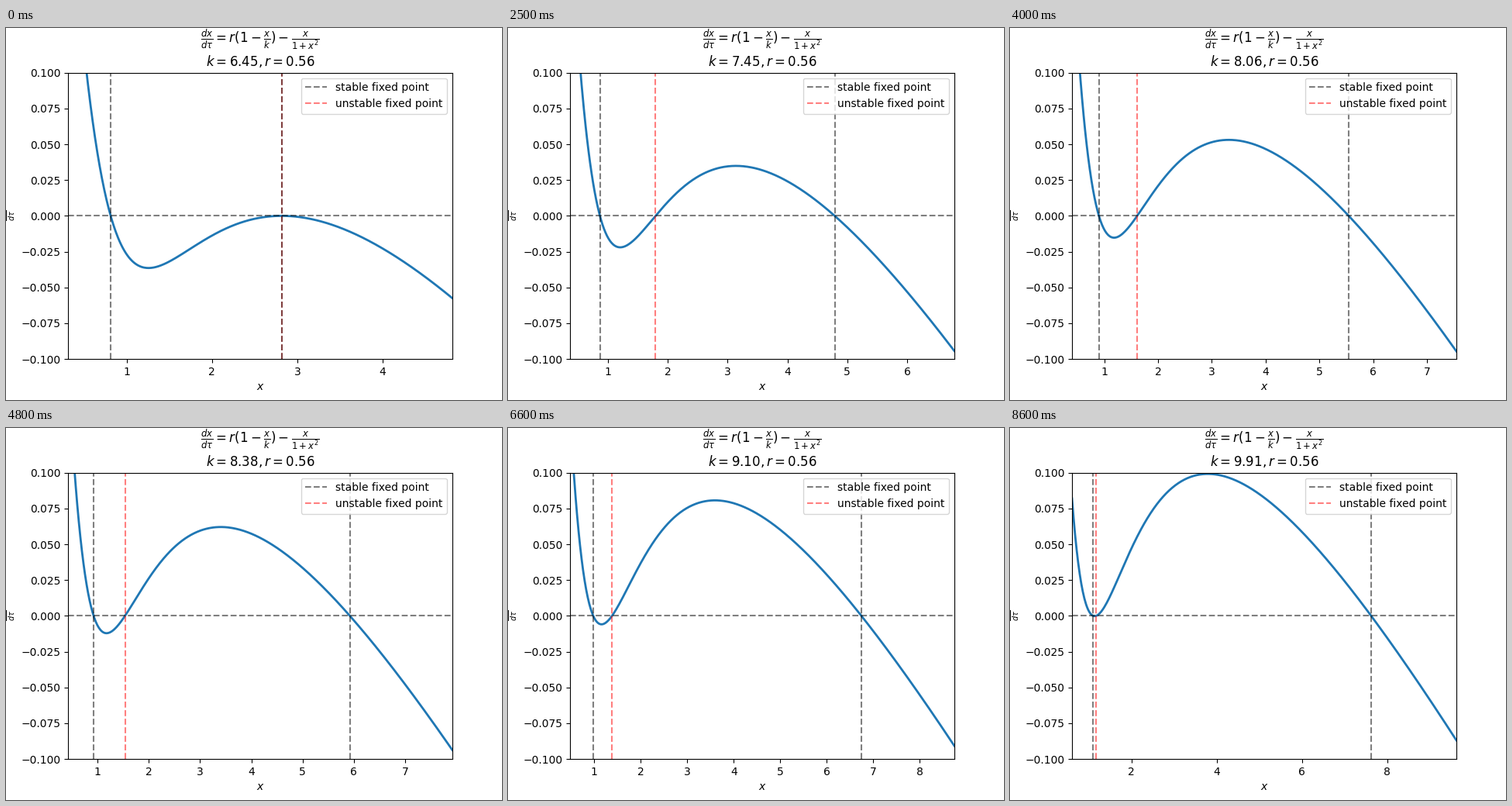
Write a matplotlib script that moves like this. It is 640 px wide and 480 px high and loops after 10 s.

```python
import numpy as np
import matplotlib.pyplot as plt
from matplotlib.animation import FuncAnimation

FRAMES, INTERVAL = 100, 100
LAST_STEP = 86          # the sweep rests here until the loop restarts
R = 0.56
K_START, K_STEP = 6.4455, 0.04026


def rate(x, k):
    return R * (1 - x / k) - x / (1 + x**2)


def fixed_points(k):
    """Real parts of the roots of r(k - x)(1 + x^2) = kx, in rising order."""
    return np.sort(np.roots([-R, R * k, -(R + k), R * k]).real)


fig, ax = plt.subplots(figsize=(6.4, 4.8), dpi=100)
curve, = ax.plot([], [], lw=2)
dashed = dict(ls="--", alpha=0.5)
ax.axhline(0, color="black", **dashed)
markers = [
    ax.axvline(1, color="black", label="stable fixed point", **dashed),
    ax.axvline(1, color="red", label="unstable fixed point", **dashed),
    ax.axvline(1, color="black", **dashed),
]
ax.set_ylim(-0.1, 0.1)
ax.set_xlabel("$x$")
ax.set_ylabel(r"$\frac{dx}{d\tau}$")
ax.legend(loc="upper right")


def update(frame):
    k = K_START + K_STEP * min(frame, LAST_STEP)
    points = fixed_points(k)
    left, right = points[0] - 0.5, points[-1] + 2
    x = np.linspace(left, right, 500)
    curve.set_data(x, rate(x, k))
    for marker, point in zip(markers, points):
        marker.set_xdata([point, point])
    ax.set_xlim(left, right)
    ax.set_title(
        r"$\frac{dx}{d\tau} = r(1-\frac{x}{k}) - \frac{x}{1+x^2}$"
        + f"\n$k={k:.2f}, r={R:.2f}$"
    )
    return curve, *markers


anim = FuncAnimation(fig, update, frames=FRAMES, interval=INTERVAL,
                     repeat=True, repeat_delay=0, blit=False)
plt.show()
```
